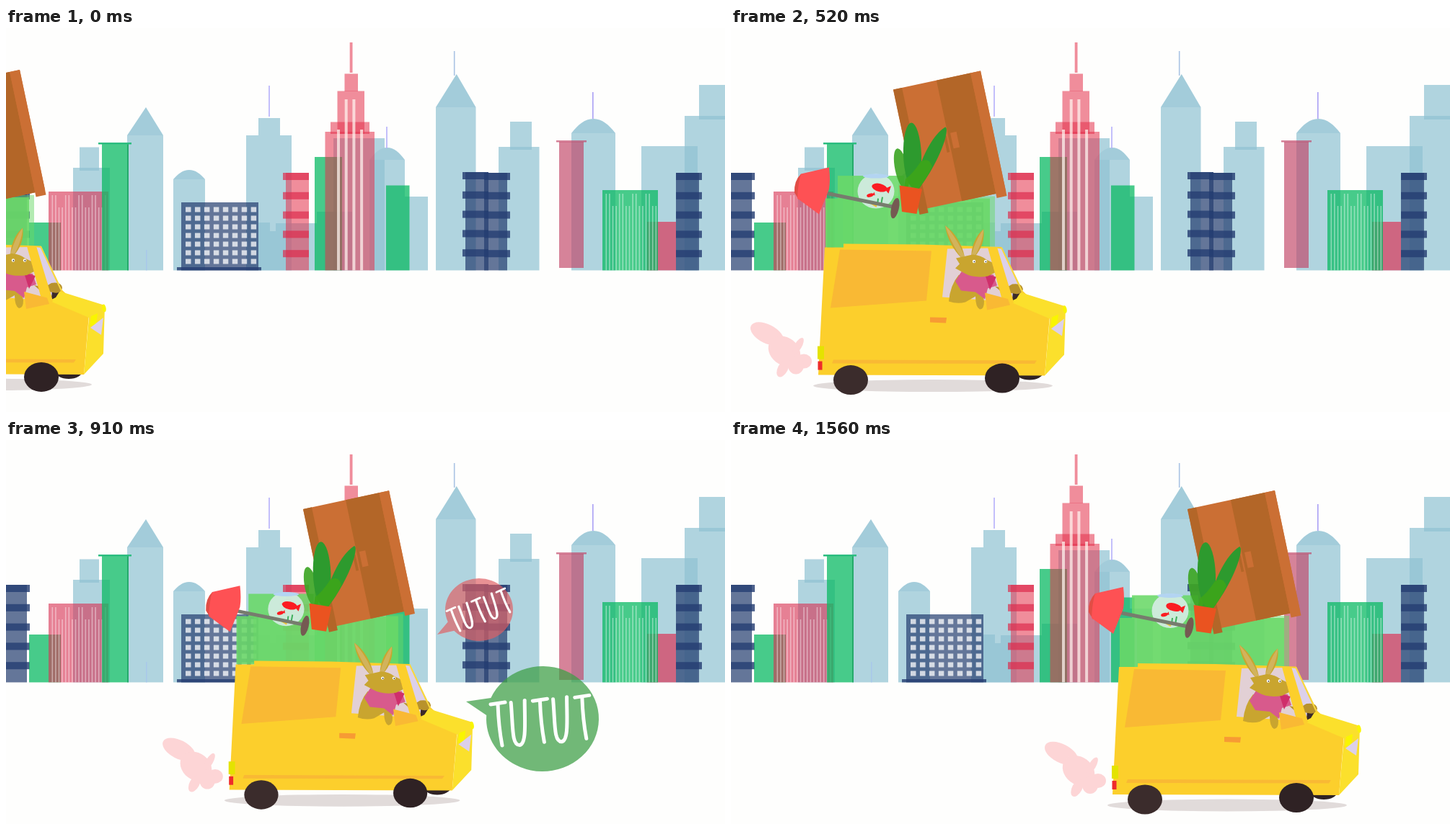
Recreate the animation shown at these times as an HTML page with a canvas. Size 997x533 px, loop 1.69 s.

```html
<!DOCTYPE html>
<html lang="en">
<head>
<meta charset="utf-8">
<title>Moving day</title>
<style>
html, body { margin: 0; width: 100%; height: 100%; overflow: hidden; background: #fefefd; }
canvas { display: block; width: 100%; height: 100%; }
</style>
</head>
<body>
<canvas id="stage" width="997" height="533" role="img" aria-label="Tutut">TUTUT</canvas>
<script>
const canvas = document.getElementById('stage');
let ctx = canvas.getContext('2d');

const STEP = 130, SLOTS = 13, GROUND = 336.4;
const BLUE = 'rgba(143,194,210,.7)', ROOF = '#a3ccda', LILAC = '#b5b0fa';
const GREEN = 'rgba(14,187,102,.76)', RED = 'rgba(227,49,76,.55)', ROSE = 'rgba(193,65,100,.65)';
const NAVY = 'rgba(35,60,110,.7)', NAVY_BAR = 'rgba(38,63,115,.82)', RED_BAR = 'rgba(222,40,75,.68)';
const GOLD = '#c9a52f', YELLOW = '#fccf2c', ORANGE = '#f9b934', GLASS = '#dcd0ea';

// ---- helpers
function box(color, x1, y1, x2, y2) {
  ctx.fillStyle = color;
  ctx.fillRect(x1, y1, x2 - x1, y2 - y1);
}
function oval(color, x, y, rx, ry, deg = 0) {
  ctx.fillStyle = color;
  ctx.beginPath();
  ctx.ellipse(x, y, rx, ry, deg * Math.PI / 180, 0, Math.PI * 2);
  ctx.fill();
}
function shape(color, d) {
  ctx.fillStyle = color;
  ctx.fill(new Path2D(d + 'Z'));
}
function line(color, width, d) {
  ctx.strokeStyle = color;
  ctx.lineWidth = width;
  ctx.stroke(new Path2D(d));
}

// ---- city
const block = (color, x1, x2, top) => box(color, x1, top, x2, GROUND);
const mast = (color, x, top, base) => box(color, x - .8, top, x + .8, base);

function stacked(x1, x2, top, inset1, inset2, capTop, overlap = 0) {
  block(BLUE, x1, x2, top);
  box(BLUE, inset1, capTop, inset2, top + overlap);
}
function peaked(x1, x2, top, base) {
  block(BLUE, x1, x2, base);
  shape(ROOF, `M${x1} ${base}L${(x1 + x2) / 2 + 1} ${top}L${x2} ${base}`);
}
function domed(x1, x2, top, base) {
  const mid = (x1 + x2) / 2, w = (x2 - x1) / 4, shoulder = top + (base - top) * .42;
  block(BLUE, x1, x2, base);
  shape(ROOF, `M${x1} ${base}C${x1 + w * .6} ${shoulder} ${mid - w * .8} ${top} ${mid} ${top}` +
    `C${mid + w * .8} ${top} ${x2 - w * .6} ${shoulder} ${x2} ${base}`);
}
function banded(x, top, color, bar, left = 4, right = 4) {
  block(color, x, x + 32, top);
  for (let i = 0; i < 5; i++) {
    const y = top + i * 26.8;
    box(bar, x - left, y, x + 32 + right, y + 10);
  }
}
function slatted(color, x1, x2, top) {
  block(color, x1, x2, top);
  for (let x = x1 + 4.5, i = 0; x < x2 - 2; x += 4.6, i++)
    box('rgba(255,255,255,.42)', x, top + (i % 4 < 2 ? 5 : 22), x + 1.6, GROUND);
}
function office(x, top) {
  block(NAVY, x, x + 107, top);
  box(NAVY_BAR, x - 6, 332, x + 111, GROUND);
  for (let i = 0; i < 56; i++) {
    const wx = x + 6 + i % 8 * 12.95, wy = top + 6.5 + Math.floor(i / 8) * 12;
    box('rgba(255,255,255,.74)', wx, wy, wx + 7.5, wy + 7);
  }
}
function landmark(mid) {
  box(RED, mid - 1.8, 20, mid + 2, 62);
  box(RED, mid - 9, 63.5, mid + 9.5, 88);
  box(RED, mid - 19, 87.5, mid + 18.5, 147);
  box(RED, mid - 28.5, 130.5, mid + 25.5, 147);
  block(RED, mid - 36, mid + 32.5, 144);
  for (let i = 0; i < 4; i++) {
    const x = mid - 19.5 + i * 10.7;
    block('rgba(255,245,240,.72)', x, x + 4, i % 3 ? 99 : 141);
  }
}
function drawCity() {
  stacked(93, 144, 194, 102, 129, 165.5, 4);
  peaked(168, 218, 110, 149);
  domed(232, 276, 197, 210);
  stacked(333, 396, 149, 350, 380, 125);
  block(BLUE, 350, 366, 270);
  block(BLUE, 366, 374, 282);
  block(BLUE, 374, 431, 271);
  block(BLUE, 431, 480, 255);
  block(BLUE, 454, 525, 153);
  domed(504, 553, 166, 183);
  block(BLUE, 553, 585, 234);
  peaked(596, 651.5, 64, 110);
  stacked(683, 739.5, 165, 699, 729, 130, 4);
  domed(784, 845, 126, 146);
  block(BLUE, 881, 959, 164);
  stacked(941, 997, 122, 961, 997, 79, 5);
  mast(LILAC, 365, 80, 123);
  mast(LILAC, 528, 137, 167);
  mast('#a9c3e4', 621.7, 32, 66);
  mast('#a9a0f5', 813.8, 89, 126);
  mast('#a9c8ea', 194.8, 308, GROUND);

  banded(-3, 201, NAVY, NAVY_BAR);
  block(GREEN, 32, 76, 270);
  slatted('rgba(215,50,85,.62)', 59, 142, 227);
  block(GREEN, 133, 170, 160);
  block('rgba(20,150,85,.5)', 168, 170, 160);
  box('#2dbd80', 128, 159, 174, 161.5);
  office(243, 242);
  banded(388, 201, RED, RED_BAR, 4, 0);
  block(GREEN, 428, 466, 179);
  landmark(478.5);
  block(GREEN, 527, 559.5, 218.5);
  banded(637, 200, NAVY, NAVY_BAR, 4, 0);
  banded(663, 201, NAVY, NAVY_BAR, 0, 4);
  box(ROSE, 767, 158, 801, 333);
  box(ROSE, 763, 156, 805, 158.5);
  block('rgba(220,50,85,.68)', 889, 929, 269);
  slatted(GREEN, 827, 904, 225);
  banded(929, 201, NAVY, NAVY_BAR, 0, 4);
}

// ---- load on the roof
function drawFish(x, y, size, tilt) {
  ctx.save();
  ctx.translate(x, y);
  ctx.rotate(tilt);
  ctx.scale(size, size);
  oval('#fb1c22', 0, 0, 11, 5.5);
  shape('#fb1c22', 'M7 0L15 -6L14 5');
  ctx.restore();
}
function drawWardrobe() {
  const light = '#cb6f34', dark = '#b36628';
  ctx.save();
  ctx.transform(121, -26, 36.5, 173.5, 311, 86);   // slanted unit square
  box(light, 0, 0, 1, .965);
  box(dark, 0, 0, .1, 1);
  box(dark, .495, 0, .885, .965);
  box(light, .885, 0, 1, 1);
  box(dark, .445, .44, .475, .57);
  box(light, .525, .425, .595, .55);
  ctx.restore();
}
function drawLuggage() {
  const crate = 'rgba(106,217,104,.88)';
  box(crate, 234, 205.5, 326, 238);
  box(crate, 217, 237, 445, 305);
  box('rgba(106,217,104,.5)', 241, 234, 452, 304);

  oval('rgba(220,238,236,.85)', 287, 227, 25.5, 24);
  oval('#b3d4f2', 287, 206, 18, 3);
  drawFish(292, 222, 1, .24);
  drawFish(279, 232.5, .45, -.26);
  line('#3eae5a', 2, 'M289 246L290 237M294 246L296 235');
  line('#eec33b', 2.5, 'M276 241L288 248');

  line('#777c6e', 5, 'M219 230L312 249');
  oval('#755a52', 313.5, 250.5, 5.3, 14.5, 13);
  shape('#e14d45', 'M183 203Q173 213 174 229L180 239L190 225');
  shape('#fe5154', 'M183 203L222 194Q224 211 222 224L208 259L178 237Q179 215 183 203');

  drawWardrobe();

  oval('rgba(62,166,38,.92)', 322.5, 196, 9, 29, -12);
  oval('#2d9a2e', 337.5, 177, 12.5, 45, -2);
  shape('#2d9a2e', 'M341 231C339 206 359 153 383 138C390 139 378 184 341 231');
  shape('rgba(62,166,24,.85)', 'M328 210Q338 203 349 186Q361 179 365 193Q354 216 341 229L326 222');
  shape('#ea5320', 'M319.5 219L351 224L343.5 258.5L323 255.5');
}

// ---- driver
function drawEar(x, y, lean, length) {
  ctx.save();
  ctx.translate(x, y);
  ctx.rotate(lean);
  for (const [color, w] of [[GOLD, 7], ['#d2b35c', 4]])
    shape(color, `M0 ${-length}C${w} ${-length * .7} ${w} ${-length * .3} 2 0L-3 0` +
      `C${-w} ${-length * .3} ${-w} ${-length * .7} 0 ${-length}`);
  ctx.restore();
}
function drawRabbit() {
  drawEar(408, 318, -.52, 50);
  drawEar(422, 317, .36, 40);
  shape(GOLD, 'M402 343Q390 357 388 380Q400 384 411 381L425 373Q425 388 431 391Q437 391 437 380L434 364');
  shape('#d85a8c', 'M406 338L450 343L455 358L442 362L438 377L425 367L405 365L397 352');
  shape('#cf2f6b', 'M438 342L454 346L445 364');
  shape(GOLD, 'M398 320L421 315Q433 316 440 322L457 330L454 339L442 345Q422 348 410 341L397 334L403 328');
  for (const x of [423, 439]) {
    oval('#fff', x, 324.5, 2.2, 2.2);
    oval('#333', x + .4, 324.8, .9, .9);
  }
  shape('#e84c3d', 'M449 332L457 329.5L454.5 338');
}

// ---- van with its load, nose to the right
function drawSmoke() {
  const puff = (...p) => oval('#fdd5d6', ...p);
  puff(136, 425, 25, 13, 27);
  puff(160, 449, 24, 19, 38);
  puff(187, 463, 11, 10);
  puff(176, 469, 11, 12);
  puff(179, 442, 5, 13, 30);
  puff(158, 473, 7, 13, 28);
}
function drawWheel(x, y, color) {
  oval(color, x, y, 24, 20.5);
}
function drawVan() {
  drawSmoke();
  oval('#e1dbda', 366, 497, 166, 8.5);
  drawLuggage();
  oval('#2f2224', 500, 478, 19, 11);
  shape(YELLOW, 'M216 305H242V300L350 301L461 304.5L491 366L528 400L521 483L207 482');
  shape('#fbe02c', 'M486 367L550 387L548 454L521 483L528 404L474 381');
  shape(ORANGE, 'M237 308L364 310L357 379L224 389');
  shape(ORANGE, 'M228 461L510 462L507 466.5L226 466');
  shape('#f79b34', 'M362 402L385 402.5L384 410L362 409');

  shape('#e2d0d5', 'M386 307L443 306L463 380L379 374');
  shape(GLASS, 'M453 306L461 307L488 365L476 374');
  drawRabbit();
  shape('#3b2a2a', 'M477 366L487 368L482 376L476 379');
  shape('#b8922c', 'M452 359L466 362L476 356Q490 354 491 363Q488 372 478 369L460 366');
  shape(YELLOW, 'M442 305H455L478 381L472 386L461 374');
  shape(ORANGE, 'M438 368L470 376.5L473 385L441 392');
  line('#f9d840', 2, 'M461 305L490 367');

  shape('#f9f500', 'M531 402L540 398L538 413L529 416');
  shape(GLASS, 'M530 418L548 404L545 428');
  oval('#f9f500', 549, 391, 2.6, 5.5, -10);
  box('#e4e300', 206, 442, 215, 460);
  box('#ee2b2b', 206.5, 463, 212.5, 475);
  drawWheel(252, 489, '#3b2c2c');
  drawWheel(462, 486.5, '#2f2224');
}

// ---- horn bubbles
function drawBubble(color, x, y, rx, ry, tipX, tipY) {
  const a = Math.atan2((tipY - y) / ry, (tipX - x) / rx), gap = .17;
  ctx.fillStyle = color;
  ctx.beginPath();
  ctx.ellipse(x, y, rx, ry, 0, a + gap, a - gap + Math.PI * 2);
  ctx.lineTo(tipX, tipY);
  ctx.fill();
}
// Five hand-drawn letters, T and U in turn, climbing to the right.
function drawLetters(x, y, turn, sx, sy) {
  ctx.save();
  ctx.translate(x, y);
  ctx.rotate(turn);
  ctx.scale(sx, sy);
  ctx.lineCap = 'round';
  ctx.translate(-58.4, 4.8);
  for (let i = 0; i < 5; i++) {
    line('#fff', 5, i % 2 ? 'M-11 1C-8 36 -10 60 1 60C11 58 8 27 8 -2' : 'M-10 1L10 -2M0 0Q1 32 6 58');
    ctx.translate(29.2, -2.4);
  }
  ctx.restore();
}
function drawSmallBubble() {
  drawBubble('rgba(225,95,100,.68)', 656, 235.5, 47, 43.5, 598, 270);
  drawLetters(651.5, 222, -.29, .63, .56);
}
function drawBigBubble() {
  drawBubble('rgba(62,160,70,.73)', 744, 387, 78, 73, 638, 363);
  drawLetters(740.4, 361.2, 0, 1, 1);
}

// ---- motion: key points [step, x], straight lines between them
const STOP = 106;
const route = [[0, -413], [2, -236], [4, -86], [5, 0], [7, STOP], [9, STOP], [10, 150], [12, 322]];

function vanX(step) {
  const i = Math.max(1, route.findIndex(([s]) => s >= step));
  const [s0, x0] = route[i - 1], [s1, x1] = route[i];
  return x0 + (x1 - x0) * (step - s0) / (s1 - s0);
}

const city = document.createElement('canvas');
city.width = canvas.width;
city.height = canvas.height;
const screen = ctx;
ctx = city.getContext('2d');
drawCity();
ctx = screen;

function frame(now) {
  const step = Math.floor(now / STEP) % SLOTS;
  const honking = step > 5 && step < 11;
  const x = vanX(step), y = honking ? 11.3 : x > 0 ? 10 : x / 200;
  const size = honking ? .984 : 1;

  box('#fefefd', 0, 0, canvas.width, canvas.height);
  ctx.drawImage(city, 0, 0);
  ctx.save();
  ctx.translate(x, y);
  ctx.scale(size, size);
  drawVan();
  ctx.restore();
  if (honking) {
    ctx.save();
    ctx.translate(x - STOP, 0);
    drawSmallBubble();
    if (step > 6) drawBigBubble();
    ctx.restore();
  }
  requestAnimationFrame(frame);
}
frame(performance.now());
</script>
</body>
</html>
```
